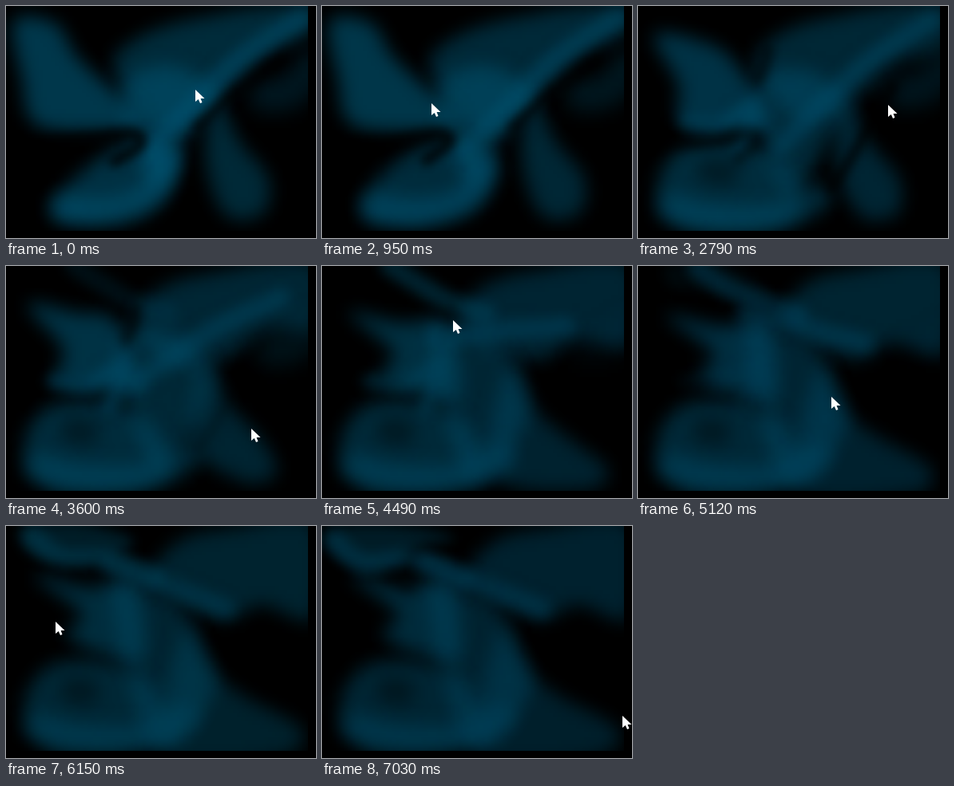
These frames come from a looping animation (388 by 291 pixels, 7060 ms). An HTML page with a canvas:

```html
<!DOCTYPE html>
<html lang="en">
<head>
<meta charset="utf-8">
<title>Ink in water</title>
<style>
  html, body { margin: 0; width: 100%; height: 100%; overflow: hidden; background: #000; }
  canvas { display: block; }
</style>
</head>
<body>
<canvas id="stage" width="388" height="291"></canvas>
<script>
const LOOP = 7060, W = 388, H = 291, COLS = 80, CELL = W / COLS;
const ctx = document.getElementById('stage').getContext('2d');
const grid = document.createElement('canvas');
grid.width = COLS;
grid.height = H / CELL;
const ink = grid.getContext('2d');

const lerp = (a, b, k) => a + (b - a) * k;
const ease = (t, [t0, t1]) => {
  const k = Math.min(1, Math.max(0, (t - t0) / (t1 - t0)));
  return k * k * (3 - 2 * k);
};

// Each shape drifts once from its first outline to its second.
// Without a width it is a closed cloud, with one an open ribbon.
const shapes = [];
function shape(from, to, options) {
  shapes.push({
    from, to, move: [0, LOOP], show: [-2, -1], hide: [LOOP, LOOP + 1],
    alpha: .5, blur: 10, width: 0, dark: false, ...options
  });
}

// Upper mass
shape([135,80, 165,40, 240,14, 385,-5, 385,30, 320,65, 275,112, 200,160],
      [180,60, 218,18, 275,4, 385,-2, 385,115, 320,98, 275,118, 205,88],
      { move: [1500, 5700], alpha: .48 });
// Centre stem
shape([150,95, 210,75, 268,115, 225,165, 192,225, 152,155],
      [135,75, 210,95, 240,145, 262,205, 190,285, 150,180],
      { move: [1500, 5700] });
// Left lobe
shape([10,18, 62,22, 90,65, 165,135, 150,156, 40,150, 20,90],
      [35,62, 100,75, 160,72, 172,165, 120,160, 75,136, 95,110],
      { move: [900, 5200], alpha: .62 });
// Basin at lower left
shape([55,250, 108,198, 160,168, 215,180, 200,235, 140,266, 80,272],
      [22,235, 45,182, 100,168, 170,188, 205,250, 160,280, 60,282],
      { move: [0, 3200], alpha: .55 });
shape([75,254, 130,258, 180,238, 200,195],
      [40,252, 100,266, 180,264, 225,240],
      { move: [0, 3000], width: 34 });
// Right lobe, later pulled along the bottom
shape([262,112, 292,170, 328,215, 322,260, 275,262, 250,190],
      [225,125, 258,182, 300,215, 370,255, 345,288, 200,285],
      { move: [2260, 5600], alpha: .45 });
shape([325,112, 355,108, 385,75], [335,100, 360,95, 385,80],
      { hide: [3000, 5500], alpha: .26, width: 42, blur: 12 });
// Diagonal ridge
shape([180,178, 235,122, 290,68, 370,15], [130,48, 175,66, 225,84, 275,104],
      { move: [2500, 5700], alpha: .42, width: 24, blur: 9 });
// Pulled tip beside the lobe
shape([65,150, 100,140, 130,125, 155,150], [60,145, 105,148, 145,125, 130,178],
      { move: [1900, 2790], show: [1100, 1700], hide: [4000, 5700], width: 20, blur: 7 });
// Streak and cloud at upper left
shape([85,0, 125,25, 160,45, 205,60], [15,18, 50,45, 115,40, 180,65],
      { move: [4490, 7000], show: [3000, 4300], alpha: .45, width: 24, blur: 8 });
shape([35,0, 100,-5, 150,20, 160,45, 80,30, 40,25],
      [5,5, 95,0, 168,15, 112,28, 82,58, 25,45],
      { move: [5200, 7000], show: [4800, 5700], alpha: .4, blur: 8 });

// Dark folds
shape([20,174, 100,166, 160,160, 168,175, 135,195],
      [30,172, 80,172, 138,160, 150,168, 125,192],
      { move: [0, 1900], hide: [1900, 4000], alpha: .8, width: 14, blur: 5, dark: true });
shape([240,152, 282,112, 345,67], [242,228, 268,188, 320,100],
      { move: [2260, 2790], hide: [2900, 4000], alpha: .7, width: 14, blur: 6, dark: true });
shape([160,10, 135,65, 95,115], [162,55, 158,75, 150,92],
      { move: [2000, 2790], show: [1100, 1700], hide: [3500, 5000], width: 16, blur: 6, dark: true });
shape([105,208, 125,212, 145,212], [84,206, 92,208, 100,208],
      { move: [1000, 3600], show: [600, 1900], alpha: .4, width: 32, dark: true });
shape([88,60, 98,65, 108,75], [82,62, 95,66, 108,76],
      { show: [5700, 7000], width: 18, blur: 7, dark: true });

// Smooth curve through the points, closed for clouds.
function trace(p, closed) {
  const n = p.length / 2;
  const at = i => {
    const j = closed ? (i + n) % n : Math.max(0, Math.min(n - 1, i));
    return [p[j * 2], p[j * 2 + 1]];
  };
  ink.beginPath();
  ink.moveTo(...at(0));
  for (let i = 0; i < (closed ? n : n - 1); i++) {
    const [a, b, c, d] = [at(i - 1), at(i), at(i + 1), at(i + 2)];
    ink.bezierCurveTo(
      b[0] + (c[0] - a[0]) / 6, b[1] + (c[1] - a[1]) / 6,
      c[0] - (d[0] - b[0]) / 6, c[1] - (d[1] - b[1]) / 6, c[0], c[1]);
  }
}

function drawInk(t) {
  const k = t / LOOP;
  const teal = `rgb(0,${lerp(90, 70, k)},${lerp(122, 96, k)})`;
  ink.setTransform(1, 0, 0, 1, 0, 0);
  ink.filter = 'none';
  ink.globalAlpha = 1;
  ink.fillStyle = '#000';
  ink.fillRect(0, 0, grid.width, grid.height);
  ink.scale(1 / CELL, 1 / CELL);
  ink.lineCap = ink.lineJoin = 'round';
  for (const s of shapes) {
    const alpha = s.alpha * ease(t, s.show) * (1 - ease(t, s.hide));
    if (!alpha) continue;
    const drift = ease(t, s.move);
    trace(s.from.map((v, i) => lerp(v, s.to[i], drift)), !s.width);
    ink.globalAlpha = alpha;
    ink.filter = `blur(${s.blur / CELL}px)`;
    ink.lineWidth = s.width;
    ink.fillStyle = ink.strokeStyle = s.dark ? '#000' : teal;
    if (s.width) ink.stroke();
    else ink.fill();
  }
}

// Turning points of the pointer: time, x, y
const stops = [
  [0, 237,105], [60, 237,105], [590, 152,236], [950, 137,122], [1200, 182,26],
  [1600, 62,152], [1900, 158,55], [2080, 245,28], [2280, 140,60], [2530, 240,210],
  [2790, 313,124], [3400, 232,224], [3560, 320,222], [3970, 106,12], [4490, 164,68],
  [4900, 368,265], [5420, 40,20], [5710, 205,300], [6410, 10,20], [6620, 262,186],
  [6800, 140,10], [7030, 375,237], [LOOP, 375,237]
];

function pointerAt(t) {
  const n = stops.length;
  const i = Math.max(0, stops.findIndex(s => s[0] > t) - 1);
  const b = stops[i], c = stops[i + 1];
  const a = stops[Math.max(0, i - 1)], d = stops[Math.min(n - 1, i + 2)];
  const span = c[0] - b[0], u = (t - b[0]) / span;
  return [1, 2].map(j => {
    const m0 = (c[j] - a[j]) / (c[0] - a[0]) * span;
    const m1 = (d[j] - b[j]) / (d[0] - b[0]) * span;
    return lerp(b[j], c[j], ease(u, [0, 1]))
      + m0 * u * (1 - u) ** 2 - m1 * u * u * (1 - u);
  });
}

const arrow = new Path2D('M0 0V15L3.8 12L6 17L8.5 16L6.6 11H11.5Z');

function draw(t) {
  drawInk(t);
  ctx.fillStyle = '#000';
  ctx.fillRect(0, 0, W, H);
  ctx.save();
  ctx.beginPath();
  ctx.rect(0, 0, 378, 282);
  ctx.clip();
  ctx.drawImage(grid, 0, 0, W, H);
  ctx.restore();

  const [x, y] = pointerAt(t);
  ctx.save();
  ctx.translate(Math.round(x), Math.round(y));
  ctx.fillStyle = '#fff';
  ctx.fill(arrow);
  ctx.restore();
}

const start = performance.now();
function tick() {
  draw((performance.now() - start) % LOOP);
  requestAnimationFrame(tick);
}
tick();
</script>
</body>
</html>
```
